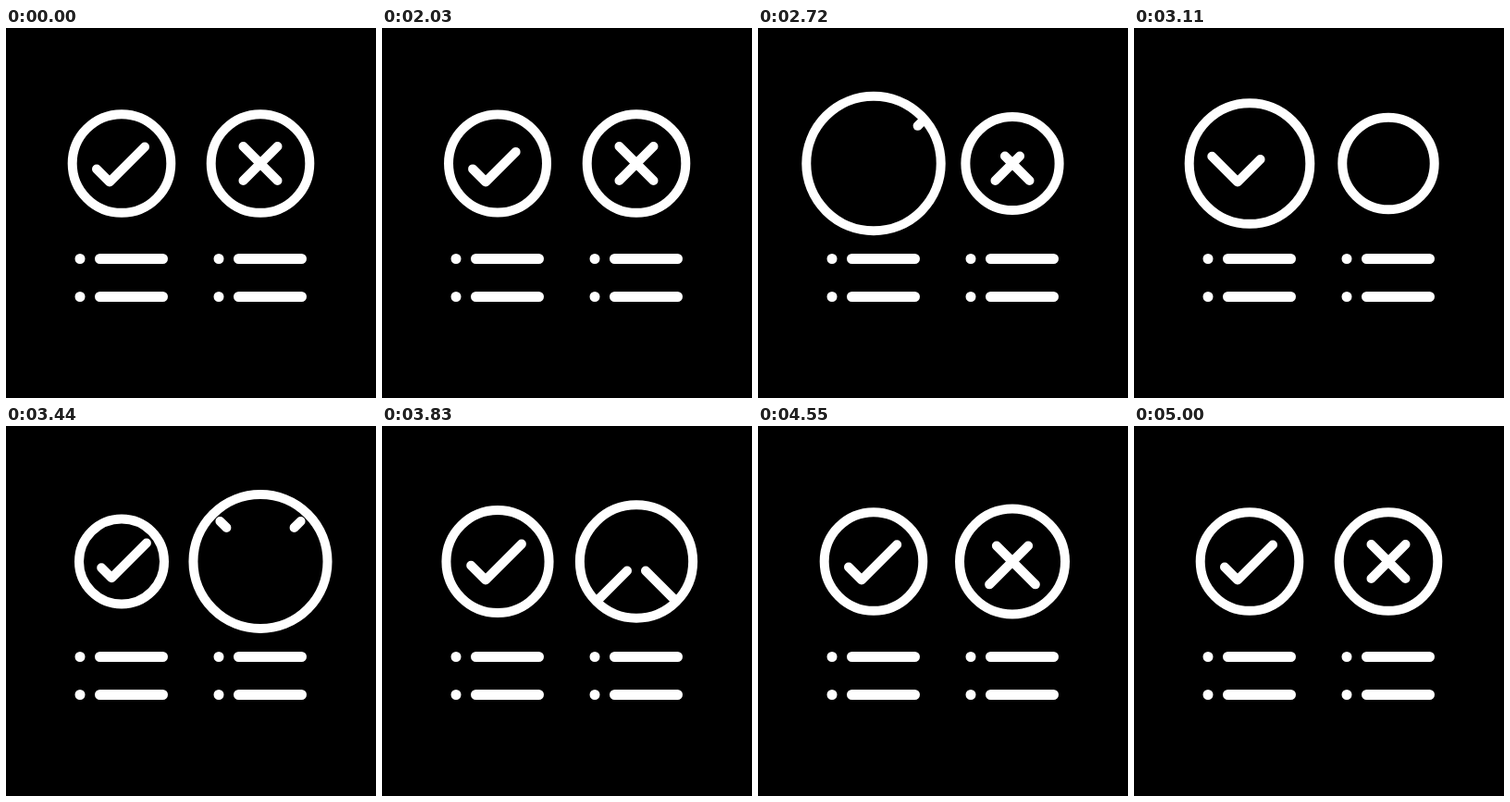
Recreate the animation shown at these times as an HTML page. Size 400 by 400 pixels, loop 5120 ms.

```html
<!DOCTYPE html>
<html lang="en">
<head>
<meta charset="utf-8">
<title>Pros and cons</title>
<style>
html, body { margin: 0; height: 100%; overflow: hidden; background: #000; }
svg { display: block; width: 100vw; height: 100vh; }
</style>
</head>
<body>
<svg viewBox="0 0 400 400" fill="none" stroke="#fff" stroke-width="10" stroke-linecap="round" stroke-linejoin="round">
  <g id="list" stroke-width="11">
    <path d="M80 249.5h.01M80 290.5h.01M101.5 249.5h68M101.5 290.5h68"/>
  </g>
  <use href="#list" x="150"/>
  <circle id="ringL" cx="125" cy="146.5"/>
  <circle id="ringR" cx="275" cy="146.5"/>
  <path id="check"/>
  <path id="cross"/>
</svg>
<script>
const LOOP = 5120, START = 2030, STEP = 30, LAST = 99;
const REST = 58.3; // outer radius of a resting ring
const $ = id => document.getElementById(id);

// Swings between [step, value] turning points with cosine easing; a repeated step is a jump.
const swing = (...turns) => n => {
  const i = turns.findIndex(([step]) => step >= n);
  if (i < 0) return turns[turns.length - 1][1];
  if (i === 0) return turns[0][1];
  const [x0, y0] = turns[i - 1], [x1, y1] = turns[i];
  return y0 + (y1 - y0) * (1 - Math.cos(Math.PI * (n - x0) / (x1 - x0))) / 2;
};

const radiusL = swing([-1, REST], [7, 50], [28, 82], [47, 51], [64, 62], [80, REST]);
const radiusR = swing([18, REST], [31, 50], [50, 79.3], [70, 53], [84, 62], [LAST, REST]);

// Check ends, measured from its corner: negative on the short arm
const checkHead = swing([20, -14], [20, 70], [35, -28], [47, -11], [62, -16], [80, -14]);
const checkTail = swing([-4, 38], [15, -14], [20, -14], [20, 70], [22, 70], [34, 24], [50, 39], [LAST, 38]);

// Cross ends, measured from its centre: negative upwards
const crossTail = swing([18, -18.5], [32, 18.5], [44, 18.5], [44, -46], [45, -46], [60, 10], [88, -18.5]);
const crossHead = swing([44, 18.5], [44, -46], [58, 40], [LAST, 18.5]);

function checkPath(n) {
  const radius = radiusL(n), reach = radius * 0.85;
  const head = Math.min(checkHead(n), reach), tail = Math.min(checkTail(n), reach);
  if (tail <= head) return "";
  const lift = Math.max(0, REST - radius) * 0.3;
  const point = s => `${112 + lift + s} ${166.5 - lift - Math.abs(s)}`;
  const corner = head < 0 && tail > 0 ? `L${point(0)}` : "";
  return `M${point(tail)}${corner}L${point(head)}`;
}

function crossPath(n) {
  const tail = crossTail(n), head = crossHead(n);
  if (head <= tail) return "";
  const arm = side =>
    `M${275 + side * tail} ${146.5 + tail}L${275 + side * head} ${146.5 + head}`;
  return arm(1) + arm(-1);
}

function draw(time) {
  const n = time < START ? LAST : Math.min(LAST, Math.floor((time - START) / STEP));
  $("ringL").setAttribute("r", radiusL(n) - 5);
  $("ringR").setAttribute("r", radiusR(n) - 5);
  $("check").setAttribute("d", checkPath(n));
  $("cross").setAttribute("d", crossPath(n));
}

const begin = performance.now();
function tick() {
  draw((performance.now() - begin) % LOOP);
  requestAnimationFrame(tick);
}
tick();
</script>
</body>
</html>
```
